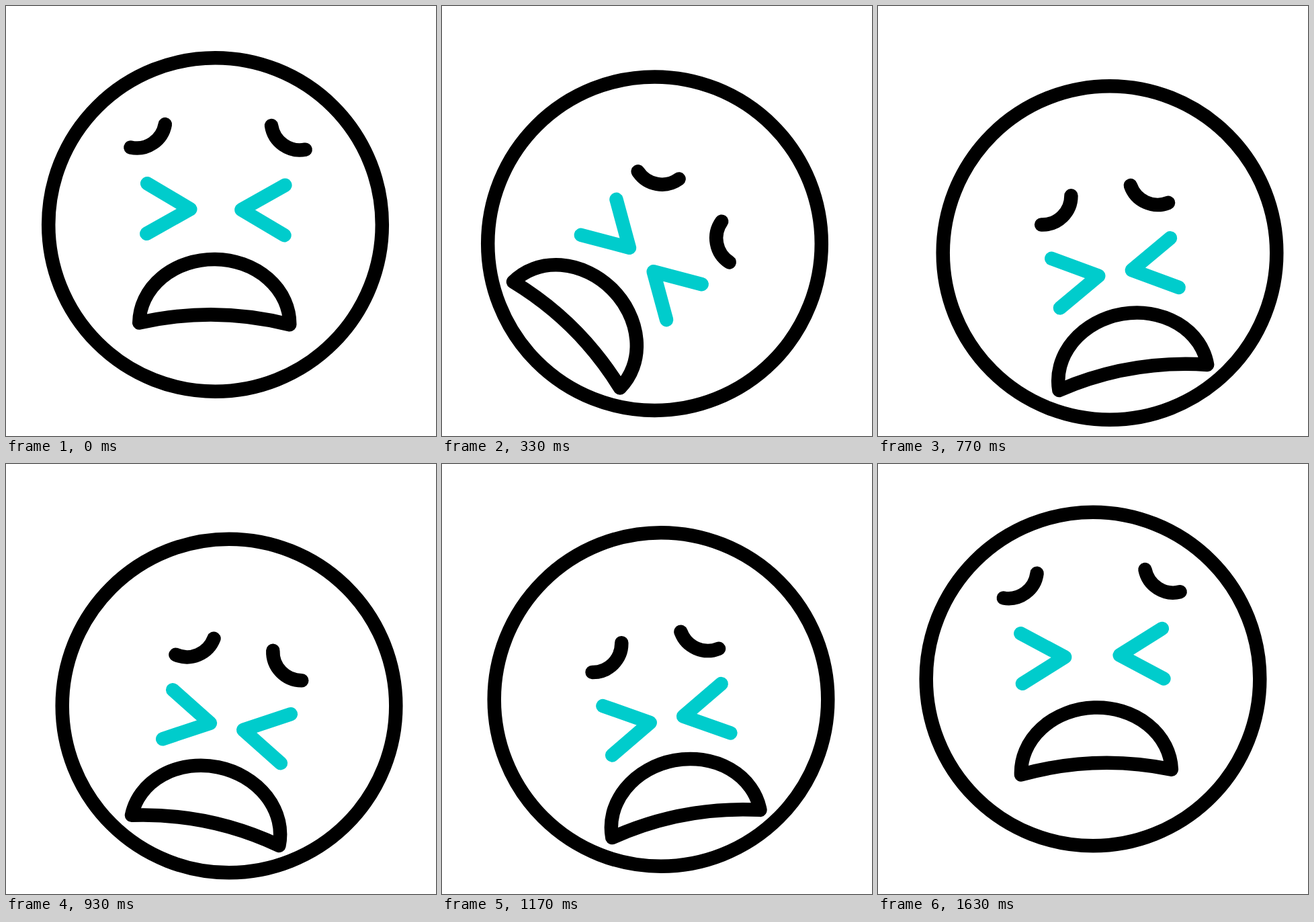
An HTML page for the animation above (1.67 s loop, 640 px wide and 640 px high).

```html
<!DOCTYPE html>
<html lang="en">
<head>
<meta charset="utf-8">
<title>Shaking weary face</title>
<style>
  html, body { margin: 0; width: 100%; height: 100%; overflow: hidden; background: #fff; }
  svg { display: block; width: 100%; height: 100%; }
</style>
</head>
<body>
<svg viewBox="-320 -320 640 640" fill="none" stroke="#000" stroke-width="20.5"
     stroke-linecap="round" stroke-linejoin="round">
  <g id="head">
    <circle r="248.3"/>
    <g id="face">
      <path id="browL" d="M-25.5 17.5A42.8 42.8 0 0 0 25.5 -17.5"/>
      <path id="browR" d="M25.5 17.5A42.8 42.8 0 0 1 -25.5 -17.5"/>
      <g stroke="#00cccc">
        <path id="eyeL" d="M-64.5 -37.3L0 0L-64.5 37.3"/>
        <path id="eyeR" d="M64.5 -37.3L0 0L64.5 37.3"/>
      </g>
      <path id="mouth" d="M-112 0A112 96 0 0 1 112 0Q0 -27 -112 0Z"/>
    </g>
  </g>
</svg>
<script>
const LOOP = 1670, FRAMES = 50, STEP = 100 / 3;

// Key poses of the shake: frame, head offset x and y, turn of the face in degrees.
const POSES = [
  [0, -8.5, 5.5, 0.7],
  [4.5, -34.5, 24, 30],
  [10, -3.5, 33.7, 44.8],
  [16, 31, 37.5, -10.8],
  [19.5, 34.5, 41, -45],
  [23, 25, 47.5, -9.8],
  [28, 12, 40, 11.6],
  [31.7, -32.5, 25.5, 45],
  [35, 6, 30.5, -10.6],
  [49, 0, 0, -2]
];

// Smooth spline through the key poses; column picks the animated value.
function pose(frame, column) {
  const last = POSES.length - 1;
  const slope = i => {
    const a = POSES[Math.max(0, i - 1)], b = POSES[Math.min(last, i + 1)];
    return (b[column] - a[column]) / (b[0] - a[0]);
  };
  const next = POSES.findIndex(p => p[0] > frame);
  const i = (next < 0 ? last : next) - 1;
  const from = POSES[i], to = POSES[i + 1];
  const w = to[0] - from[0], u = (frame - from[0]) / w, v = 1 - u;
  return from[column] * v * v * (1 + 2 * u) + to[column] * u * u * (1 + 2 * v)
       + w * u * v * (slope(i) * v - slope(i + 1) * u);
}

const mix = (a, b, k) => a + (b - a) * k;

function ease(x) {
  const t = Math.min(1, Math.max(0, x));
  return t * t * (3 - 2 * t);
}

// How far the face looks down: quick dip, hold, slower return.
const bow = frame => Math.min(ease((frame + 2) / 7), ease((50.4 - frame) / 14));

function place(id, x, y, turn = 0) {
  document.getElementById(id)
    .setAttribute('transform', `translate(${x} ${y}) rotate(${turn})`);
}

function placePair(name, center, gap, y) {
  place(name + 'L', center - gap / 2, y);
  place(name + 'R', center + gap / 2, y);
}

function draw(time) {
  const frame = Math.min(FRAMES - 1, Math.floor((time % LOOP + 4) / STEP));
  const down = bow(frame);
  place('head', pose(frame, 1), pose(frame, 2));
  place('face', 0, 0, pose(frame, 3));
  placePair('brow', 2.6, mix(212, 140.7, down * down), mix(-144.5, -76.2, down));
  placePair('eye', 2.8 * down, mix(82.5, 50.3, down), mix(-36, 30.8, down));
  place('mouth', 2.7 * down, mix(137.2, 188.7, down));
}

const start = performance.now();
function tick() {
  draw(performance.now() - start);
  requestAnimationFrame(tick);
}
tick();
</script>
</body>
</html>
```
